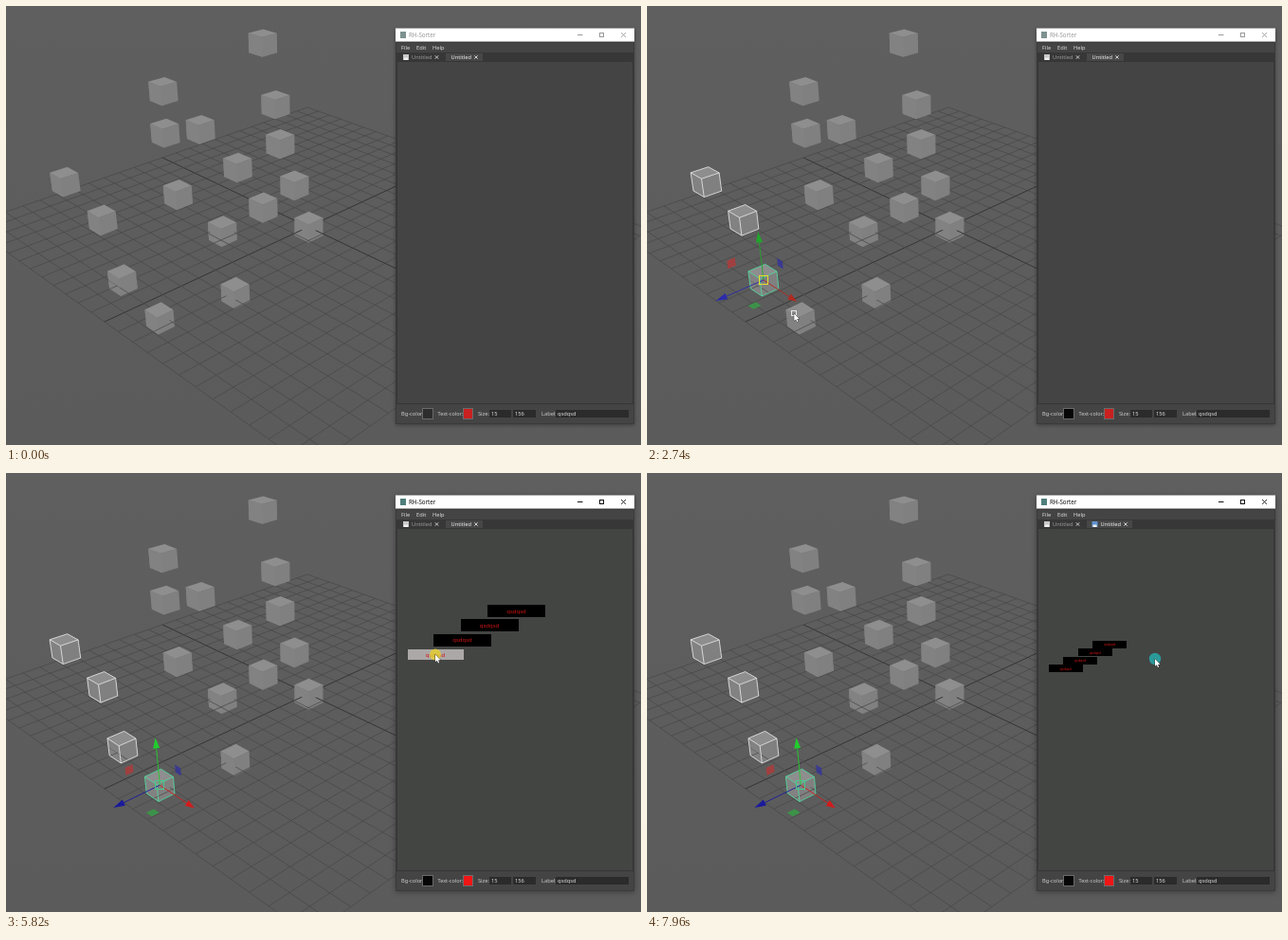
An HTML page with a canvas that plays this animation: 670 by 463 pixels, repeating every 8 s.

```html
<!DOCTYPE html>
<html lang="en">
<head>
<meta charset="utf-8">
<title>Button picker</title>
<style>
html, body { margin: 0; width: 100%; height: 100%; overflow: hidden; background: #5d5d5d; }
canvas { display: block; }
</style>
</head>
<body>
<canvas id="stage" width="670" height="463"></canvas>
<script>
const ctx = document.getElementById('stage').getContext('2d');
const LOOP = 8000, TICK = 66.87;
const UI = '"Noto Sans", "Open Sans", sans-serif';

// Homogeneous columns of the camera, one grid cell per unit.
const U = [-10.49, -3.82, 0.01417];
const V = [-19.38, 3.675, -0.014];
const UP = [-3.365, -21.1, -0.01055];
const ORIGIN = [319, 233];

// Cubes stand in short strands; the first four get picked.
const DIAGONAL = [39.3, 40.2], DROP = [13.5, 65], STEEP = [15, 43.7];
const strand = (x, y, n, [dx, dy]) => Array.from({ length: n }, (_, i) => [x + dx * i, y + dy * i]);
const CUBES = [
  ...strand(62.5, 185.5, 2, DIAGONAL), ...strand(123, 289, 2, DIAGONAL),
  ...strand(166, 90, 3, DIAGONAL), ...strand(271, 39, 2, DROP),
  ...strand(168, 134, 2, DROP), ...strand(228.5, 237.5, 2, DROP),
  ...strand(289.5, 145.5, 3, STEEP), [271.5, 212.5]
];
const onGround = c => c[1] > 230;
const PICKS = 4;
const pickTime = i => 1125 + 740 * i;

const ACTIVE_AT = 4000, PRESS_AT = 5070, RELEASE_AT = 6010, ZOOM_AT = 6610, GRAB_AT = 7420;
const PRESS = [538.5, 145.5], RELEASE = [459.5, 188.2];
const ANCHOR = [519.5, 172], GRAB = [578.5, 171.3];

// Pointer moves: start, end, goal
const near = (c, dy) => [c[0] - 7, c[1] + dy];
const MOVES = [[265, 930, near(CUBES[0], 5)]];
for (let i = 1; i < PICKS; i++) {
  const t = pickTime(i - 1);
  MOVES.push([t, t + 130, near(CUBES[i], -5)], [t + 340, t + 670, near(CUBES[i], 3)]);
}
MOVES.push(
  [3400, 4200, [550, 159]],
  [4880, PRESS_AT, PRESS],
  [PRESS_AT, 5800, [453, 191.5]],
  [5950, RELEASE_AT, RELEASE],
  [6410, ZOOM_AT, [520, 173]],
  [6900, 7290, GRAB],
  [GRAB_AT, 7690, [525, 173]],
  [7760, 7950, [536, 196]]
);

function pointer(t) {
  let x = 448, y = 434;
  for (const [from, to, goal] of MOVES) {
    const k = Math.min(1, Math.max(0, (t - from) / (to - from)));
    const e = k * k * (3 - 2 * k);
    x += (goal[0] - x) * e;
    y += (goal[1] - y) * e;
  }
  return [x, y];
}

function project([x, y], u, v, h) {
  const w = 1 + u * U[2] + v * V[2] + h * UP[2];
  return [
    (x + u * U[0] + v * V[0] + h * UP[0]) / w,
    (y + u * U[1] + v * V[1] + h * UP[1]) / w
  ];
}

function trace(points, closed = true) {
  ctx.beginPath();
  points.forEach(p => ctx.lineTo(p[0], p[1]));
  if (closed) ctx.closePath();
}

function fillPoly(points, color) {
  trace(points);
  ctx.fillStyle = color;
  ctx.fill();
}

function strokePath(points, color, width = 1, closed = false) {
  trace(points, closed);
  ctx.strokeStyle = color;
  ctx.lineWidth = width;
  ctx.stroke();
}

function box(x, y, w, h, color) {
  ctx.fillStyle = color;
  ctx.fillRect(x, y, w, h);
}

function frame(x, y, w, h, color) {
  ctx.strokeStyle = color;
  ctx.lineWidth = 1;
  ctx.strokeRect(x + 0.5, y + 0.5, w - 1, h - 1);
}

function disc([x, y], r, color) {
  ctx.beginPath();
  ctx.arc(x, y, r, 0, 7);
  ctx.fillStyle = color;
  ctx.fill();
}

function label(str, x, y, color = '#cccccc', size = 5.7, align = 'left') {
  ctx.font = size + 'px ' + UI;
  ctx.textAlign = align;
  ctx.textBaseline = 'middle';
  ctx.fillStyle = color;
  ctx.fillText(str, x, y);
}

function drawGrid() {
  for (let i = -12; i <= 12; i++) {
    const color = i ? '#484848' : '#353535', width = i ? 0.75 : 1;
    strokePath([project(ORIGIN, i, -12, 0), project(ORIGIN, i, 12, 0)], color, width);
    strokePath([project(ORIGIN, -12, i, 0), project(ORIGIN, 12, i, 0)], color, width);
  }
}

function drawCube(c, edge) {
  const ring = h => [[0.5, 0.5], [0.5, -0.5], [-0.5, -0.5], [-0.5, 0.5]].map(([u, v]) => project(c, u, v, h));
  const [a, b, d, e] = ring(0.5), [a2, , d2, e2] = ring(-0.5);
  fillPoly([a, e, d, d2, e2, a2], '#808080');
  fillPoly([a, e, e2, a2], '#828282');
  fillPoly([a, b, d, e], '#8e8e8e');
  if (onGround(c)) {
    const [ma, , md, me] = ring(0);
    ctx.save();
    trace([ma, me, md, d2, e2, a2]);
    ctx.clip();
    drawGrid();
    ctx.restore();
  }
  if (edge) {
    strokePath([a, b, d, d2, e2, a2], edge, 0.8, true);
    strokePath([a, e, d], edge, 0.8);
    strokePath([e, e2], edge, 0.8);
  }
}

function drawArrow(c, dir, color) {
  const at = k => project(c, dir[0] * k, dir[1] * k, dir[2] * k);
  const base = at(2.15), tip = at(2.75);
  const dx = tip[0] - base[0], dy = tip[1] - base[1], n = 3.5 / Math.hypot(dx, dy);
  strokePath([c, base], color, 0.9);
  fillPoly([tip, [base[0] - dy * n, base[1] + dx * n], [base[0] + dy * n, base[1] - dx * n]], color);
}

function drawPlane(c, p, q, color) {
  const corners = [[-1, -1], [1, -1], [1, 1], [-1, 1]].map(([i, j]) => {
    const m = 1.65 + i * 0.22, n = 1.65 + j * 0.22;
    return project(c, ...p.map((_, k) => p[k] * m + q[k] * n));
  });
  ctx.globalAlpha = 0.8;
  fillPoly(corners, color);
  ctx.globalAlpha = 1;
}

function drawHandles(c, active) {
  const x = [-1, 0, 0], y = [0, 0, 1], z = [0, 1, 0];
  drawPlane(c, y, z, '#b23a3a');
  drawPlane(c, x, y, '#33339c');
  drawPlane(c, x, z, '#35a045');
  drawArrow(c, z, active ? '#1a1a9c' : '#2c2ca8');
  drawArrow(c, x, active ? '#d01c1c' : '#b02a22');
  drawArrow(c, y, active ? '#22cc2e' : '#22a52c');
  frame(Math.round(c[0]) - 5, Math.round(c[1]) - 5, 10, 10, active ? '#45c98c' : '#e6de2a');
}

function drawScene(t, active) {
  const sky = ctx.createLinearGradient(0, 0, 0, 463);
  sky.addColorStop(0, '#5f5f5f');
  sky.addColorStop(1, '#5b5b5b');
  box(0, 0, 670, 463, sky);
  drawGrid();
  let lead = -1;
  while (lead + 1 < PICKS && t >= pickTime(lead + 1)) lead++;
  CUBES.forEach((c, i) => drawCube(c, i === lead ? '#4fe0a0' : i < lead ? '#ececec' : null));
  if (lead >= 0) drawHandles(CUBES[lead], active);
}

function drawCross(x, y, r, color) {
  strokePath([[x - r, y - r], [x + r, y + r]], color, 0.9);
  strokePath([[x - r, y + r], [x + r, y - r]], color, 0.9);
}

function drawTab(x, saved, iconColor, color) {
  if (saved) {
    box(x, 51, 6, 6, iconColor);
    box(x + 1, 54.5, 4, 2.5, '#f0f0f0');
    x += 9;
  }
  label('Untitled', x, 54.3, color);
  drawCross(x + 26.5, 54, 1.7, '#dddddd');
}

function drawSwatch(x, w, color) {
  frame(x - 1, 424, w + 2, 12, '#6a6a6a');
  box(x, 425, w, 10, color);
}

function drawField(x, w, str) {
  box(x, 426, w, 8, '#2b2b2b');
  label(str, x + 2, 430.3, '#dddddd');
}

function drawWindow(t, active) {
  ctx.save();
  ctx.shadowColor = 'rgba(0,0,0,.35)';
  ctx.shadowBlur = active ? 6 : 4;
  ctx.shadowOffsetY = 1;
  box(411, 24, 252, 417, '#444444');
  ctx.restore();

  const ink = active ? '#111111' : '#999999';
  box(411, 23.5, 252, 14, '#ffffff');
  box(416, 27, 6, 7, active ? '#4f7f7c' : '#7d9290');
  label('RH-Sorter', 425, 30.8, ink, 6.2);
  strokePath([[603, 30.5], [608.5, 30.5]], ink);
  frame(626, 28, 5, 5, ink);
  drawCross(651.5, 30.5, 2.4, ink);

  label('File', 417, 44.3, '#dddddd');
  label('Edit', 433, 44.3, '#dddddd');
  label('Help', 450, 44.3, '#dddddd');

  const dirty = t >= 6480;
  box(412, 49, 250, 9, '#373737');
  box(464, 50, dirty ? 48 : 39, 9, '#474747');
  drawTab(419, true, '#c8c8c8', '#9a9a9a');
  drawTab(469.5, dirty, '#5d92cf', '#f0f0f0');

  box(412, 58, 250, 362, active ? '#434543' : '#444444');
  frame(412, 58, 250, 362, '#363636');

  label('Bg-color:', 417, 430.3);
  label('Text-color:', 455.5, 430.3, '#cccccc', 5.5);
  label('Size:', 498, 430.3);
  label('Label:', 565, 430.3);
  drawSwatch(440, 10, t < 320 ? '#2d2d2d' : '#060606');
  drawSwatch(483, 9, active ? '#f01616' : '#c92020');
  drawField(510, 23, '15');
  drawField(535, 24, '156');
  drawField(580, 77, 'qsdqsd');
  frame(411, 38, 252, 403, '#3a3a3a');
}

function drawMenu() {
  box(522, 154, 92, 24, '#525252');
  box(523, 155, 90, 11, '#5c7f96');
  label('Add multiple buttons', 530, 160.8, '#eeeeee');
  label('Add single button', 530, 172, '#dddddd');
}

function drawButtons(t, cur) {
  const held = t < RELEASE_AT;
  const end = held ? cur : RELEASE;
  const steps = Math.floor((t - ZOOM_AT) / TICK) + 1;
  const zoom = 0.9 ** Math.min(5, Math.max(0, steps));
  const pan = t >= GRAB_AT ? [cur[0] - GRAB[0], cur[1] - GRAB[1]] : [0, 0];
  const w = Math.round(60.5 * zoom), h = Math.round(12.8 * zoom);
  ctx.save();
  ctx.beginPath();
  ctx.rect(413, 59, 248, 360);
  ctx.clip();
  for (let i = 0; i < 4; i++) {
    const [x, y] = [0, 1].map(k => {
      const p = PRESS[k] + (end[k] - PRESS[k]) * i / 3;
      return ANCHOR[k] + (p - ANCHOR[k]) * zoom + pan[k];
    });
    const hover = i === 3 && t < 6410;
    const fill = hover ? (held ? '#aca8a8' : '#898989') : '#000000';
    const trim = hover ? 1 : 0;
    box(Math.round(x - w / 2) + trim, Math.round(y - h / 2) + trim, w - 2 * trim, h - 2 * trim, fill);
    label('qsdqsd', x, y + 0.3, '#d01616', 6 * zoom, 'center');
  }
  ctx.restore();
}

function drawPointer([x, y]) {
  if (x < 411) frame(Math.round(x) - 3, Math.round(y) - 3, 6, 6, '#e8e8e8');
  const shape = [[0, 0], [0, 7.8], [1.8, 6.2], [3, 9], [4.2, 8.5], [3, 5.9], [5.4, 5.7]];
  const points = shape.map(p => [x + p[0], y + p[1]]);
  strokePath(points, '#222222', 0.8, true);
  fillPoly(points, '#ffffff');
}

function draw(now) {
  const t = Math.floor((now % LOOP + 8) / TICK) * TICK;
  const active = t >= ACTIVE_AT;
  const cur = pointer(t);
  drawScene(t, active);
  drawWindow(t, active);
  if (t >= 4400 && t < 4740) drawMenu();
  if (t >= PRESS_AT) drawButtons(t, cur);
  if (t >= PRESS_AT && t < RELEASE_AT) disc(cur, 6, 'rgba(226,205,50,.85)');
  if (t >= GRAB_AT) disc(cur, 6.2, '#2a9a9a');
  if (t >= 320) drawPointer(cur);
}

const start = performance.now();
function loop() {
  draw(performance.now() - start);
  requestAnimationFrame(loop);
}
loop();
</script>
</body>
</html>
```
